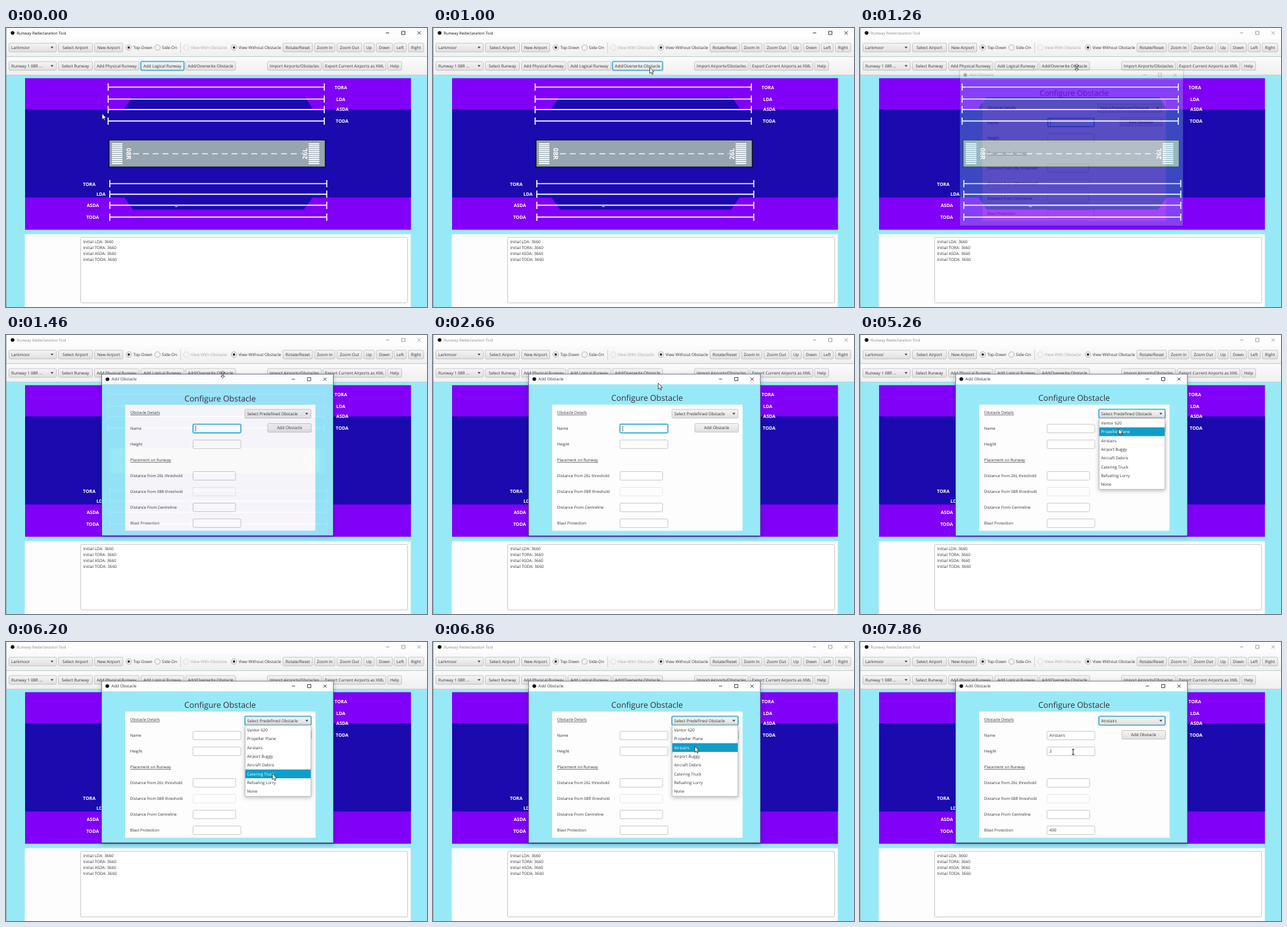
Animation, 640 px wide and 424 px high, one loop 8000 ms. Source, as an HTML page:

```html
<!DOCTYPE html>
<html lang="en">
<head>
<meta charset="utf-8">
<title>Runway Redeclaration Tool</title>
<style>
  html, body { margin: 0; width: 100%; height: 100%; overflow: hidden; }
  svg { display: block; width: 640px; height: 424px; }
  text { font: 6.2px "Open Sans", "Noto Sans", sans-serif; fill: #333; text-rendering: geometricPrecision; white-space: pre; }
  .mid { text-anchor: middle; }
  .tag { font-size: 7px; font-weight: 700; fill: #fff; text-anchor: middle; }
  .num { font-size: 10px; font-weight: 700; fill: #fff; text-anchor: middle; }
  .head { font-size: 12.25px; text-anchor: middle; }
  .btn { fill: url(#face); stroke: #bcbcbc; stroke-width: .8; }
  .field { fill: #fff; stroke: #c4c4c4; stroke-width: .9; }
  .focus { fill: none; stroke: #1a9fca; stroke-width: 1.1; }
  .glyph { fill: none; stroke: currentColor; stroke-width: .8; }
</style>
</head>
<body>
<svg id="stage" viewBox="0 0 640 424" xmlns="http://www.w3.org/2000/svg"></svg>
<script>
const WHITE = '#fdfdfd', CYAN = '#98e9f7', PURPLE = '#8000f8', BLUE = '#1b0aae';
const LOOP = 8000, ROW_TOP = 127, ROW_H = 13.35;
const OPEN_AT = 4600, PICK_AT = 7000;
const ITEMS = ['Vantor 620', 'Propeller Plane', 'Airstairs', 'Airport Buggy',
  'Aircraft Debris', 'Catering Truck', 'Refueling Lorry', 'None'];

const rect = (x1, y1, x2, y2, attrs = '') =>
  `<rect x="${x1}" y="${y1}" width="${x2 - x1}" height="${y2 - y1}" ${attrs}/>`;
const text = (x, cy, str, attrs = '') => `<text x="${x}" y="${cy + 2.2}" ${attrs}>${str}</text>`;
const path = (d, attrs = '') => `<path d="${d}" ${attrs}/>`;
const group = (id, body, attrs = '') => `<g id="${id}" ${attrs}>${body}</g>`;

const button = (x1, x2, cy, str) =>
  rect(x1, cy - 6.6, x2, cy + 6.6, 'rx="1.6" class="btn"') +
  text((x1 + x2) / 2, cy, str, 'class="mid"');
const focus = (id, x1, y1, x2, y2) =>
  group(id, rect(x1 - .8, y1 - .8, x2 + .8, y2 + .8, 'rx="2" fill="none" stroke="#9edcf0" stroke-width=".9"') +
    rect(x1, y1, x2, y2, 'rx="1.6" class="focus"'));
const combo = (x1, x2, cy, str, id = '') =>
  rect(x1, cy - 6.6, x2, cy + 6.6, 'rx="1.6" class="btn"') +
  text(x1 + 3.6, cy, str, id && `id="${id}"`) +
  path(`M${x2 - 8.8} ${cy - 1.2}h4.6l-2.3 2.6z`, 'fill="#333"');
const radio = (x, cy, str, on, dim) =>
  `<g ${dim ? 'opacity=".4"' : ''}><circle cx="${x}" cy="${cy}" r="4.2" fill="#f4f4f4" stroke="#ababab" stroke-width=".9"/>` +
  (on ? `<circle cx="${x}" cy="${cy}" r="1.9" fill="#333"/>` : '') +
  text(x + 6.8, cy, str) + '</g>';
const windowGlyphs = (x, cy) => path(
  `M${x - 2.5} ${cy}h5M${x + 21.5} ${cy - 2.5}h5v5h-5zM${x + 45.5} ${cy - 2.5}l5 5m0-5l-5 5`, 'class="glyph"');
const icon = (x, cy) => `<circle cx="${x}" cy="${cy}" r="2.8" fill="#111"/>`;

function toolbar() {
  let s = rect(0, 0, 640, 16, `fill="${WHITE}"`) + icon(10, 7.5) +
    group('mainBar', text(16.3, 7.6, 'Runway Redeclaration Tool', 'style="font-size:6px;fill:currentColor"') +
      windowGlyphs(580, 7.5));
  for (const y of [16, 44])
    s += rect(0, y, 640, y + 27.4, 'fill="url(#bar)"') + rect(0, y + 27, 640, y + 27.7, 'fill="#c2c2c2"');
  s += combo(4.5, 76.5, 29.7, 'Larkmoor') + combo(4.5, 76.5, 57.6, 'Runway 1 08R ...');
  const top = [[79.5, 131.5, 'Select Airport'], [134.5, 177.5, 'New Airport'], [421, 466, 'Rotate/Reset'],
    [469, 500, 'Zoom In'], [503, 541, 'Zoom Out'], [544, 560, 'Up'], [563, 587.5, 'Down'],
    [590, 608.5, 'Left'], [611.5, 635, 'Right']];
  const low = [[79.5, 131.5, 'Select Runway'], [134.5, 202, 'Add Physical Runway'],
    [205, 270.5, 'Add Logical Runway'], [273, 349, 'Add/Overwrite Obstacle'],
    [397.5, 479.5, 'Import Airports/Obstacles'], [482, 577.5, 'Export Current Airports as XML'], [580, 601.5, 'Help']];
  for (const [a, b, str] of top) s += button(a, b, 29.7, str);
  for (const [a, b, str] of low) s += button(a, b, 57.6, str);
  return s + radio(186.6, 29.7, 'Top-Down', true) + radio(230.3, 29.7, 'Side-On') +
    rect(265.2, 22, 265.9, 38, 'fill="#c4c4c4"') +
    radio(274, 29.7, 'View With Obstacle', false, true) + radio(346.6, 29.7, 'View Without Obstacle', true) +
    focus('focusLogical', 205, 51, 270.5, 64.2) + focus('focusAdd', 273, 51, 349, 64.2);
}

function runway() {
  let s = rect(29, 76.3, 615.6, 306.6, `fill="${PURPLE}"`) +
    path('M29 123.7H179L192 105H455L467 123.7H615.6V257.5H466L453 276H193L180 257.5H29z', `fill="${BLUE}"`) +
    rect(156, 169.8, 486, 211.6, 'fill="#0a0a14"') + rect(157.3, 170.8, 484.7, 210.6, 'fill="#97a5b0"');
  for (let i = 0; i < 11; i++) {
    const y = 175.2 + i * 2.98;
    s += rect(161, y, 177, y + 1.8, 'fill="#fff"') + rect(460, y, 476.3, y + 1.8, 'fill="#fff"');
  }
  s += path('M193 191.2H449', 'stroke="#fff" stroke-width="1.3" stroke-dasharray="9 6"') +
    '<text class="num" transform="translate(182.6 191.2) rotate(90)">08R</text>' +
    '<text class="num" transform="translate(458 191.2) rotate(-90)">26L</text>';
  const measure = (x1, x2, y, tx, ty, name) =>
    path(`M${x1} ${y}H${x2}M${x1} ${y - 5.5}v11M${x2} ${y - 5.5}v11`, 'stroke="#fff" stroke-width="1.6"') +
    `<text class="tag" x="${tx}" y="${ty + 2.5}">${name}</text>`;
  const upper = [['TORA', 89.8, 509, 90.4], ['LDA', 108, 509, 108.4], ['ASDA', 123.9, 511.4, 123.9], ['TODA', 141.4, 511, 141.9]];
  const lower = [['TORA', 236.5, 126.5, 237.8], ['LDA', 252.6, 144.5, 252.2], ['ASDA', 269.4, 132, 269.7], ['TODA', 287.4, 131.6, 287.8]];
  for (const [name, y, tx, ty] of upper) s += measure(155.3, 483.8, y, tx, ty, name);
  for (const [name, y, tx, ty] of lower) s += measure(157.8, 487.6, y, tx, ty, name);
  return s + path('M257 271.3h4', 'stroke="#a9e4f2" stroke-width="1"');
}

function log() {
  let s = rect(28.5, 313.4, 615.4, 424, `fill="${WHITE}"`) +
    rect(113.5, 318.3, 610.4, 417.8, 'rx="1.6" class="field"');
  ['LDA', 'TORA', 'ASDA', 'TODA'].forEach((name, i) => s += text(117.2, 324.8 + i * 9, `Initial ${name}: 3660`));
  return s;
}

function dialog() {
  let s = rect(145, 59, 498, 306, 'fill="#3b3a6a" filter="url(#shade)"') +
    rect(145.6, 59.6, 497.4, 75.2, `fill="${WHITE}"`) + rect(145.6, 75, 497.4, 304.8, `fill="${CYAN}"`) +
    icon(154, 67) + text(160.3, 67, 'Add Obstacle') +
    group('dialogGlyphs', windowGlyphs(437, 67), 'color="#222"') +
    text(325.5, 96, 'Configure Obstacle', 'class="head" dy="2.2"') +
    rect(181, 105.8, 470.6, 297.5, `fill="${WHITE}"`);
  const rows = [['Obstacle Details'], ['Name', 357, 'name'], ['Height', 357, 'height'], ['Placement on Runway'],
    ['Distance from 26L threshold', 349], ['Distance from 08R threshold', 349],
    ['Distance From Centreline', 349], ['Blast Protection', 357, 'blast']];
  rows.forEach(([label, right, id], i) => {
    const cy = 118.1 + i * 24;
    s += text(188.8, cy, label, `style="font-size:6px${right ? '' : ';text-decoration:underline'}"`);
    if (right) s += rect(284.3, cy - 6.5, right, cy + 6.5, `rx="1.6" class="field" ${i === 5 ? 'opacity=".4"' : ''}`);
    if (id) s += text(288, cy, '', `id="${id}"`);
  });
  s += focus('focusName', 284.3, 135.6, 357, 148.6) + rect(288.2, 138, 288.8, 146.4, 'id="caret" fill="#222"') +
    button(398, 464.4, 141.1, 'Add Obstacle') + combo(363.2, 463.8, 119.6, 'Select Predefined Obstacle', 'choice') +
    focus('focusChoice', 363.2, 113, 463.8, 126.2);
  let list = rect(363.4, 126.7, 463.6, 234.4, 'fill="#fff" stroke="#b4b4b4" stroke-width=".8" filter="url(#shade)"') +
    rect(363.8, 0, 463.2, ROW_H, 'id="hover" fill="#0f9ec8"');
  ITEMS.forEach((item, i) => list += text(366.4, ROW_TOP + (i + .5) * ROW_H, item, 'class="item"'));
  return s + group('list', list);
}

const cursors =
  group('arrow', path('M0 0V9.2L2.1 7.3 3.6 10.6 5 10 3.6 6.8H6.5z', 'fill="#fff" stroke="#111" stroke-width=".7"')) +
  group('resize', path('M0 -5.4L2.8 -2.4H.8V2.4H2.8L0 5.4-2.8 2.4H-.8V-2.4H-2.8z', 'fill="#fff" stroke="#111" stroke-width=".7"')) +
  group('beam', path('M-2 -4H2M0 -4V4M-2 4H2', 'fill="none" stroke="#111" stroke-width=".9"'));

const gradient = (id, a, b) =>
  `<linearGradient id="${id}" x2="0" y2="1"><stop stop-color="${a}"/><stop offset="1" stop-color="${b}"/></linearGradient>`;

document.getElementById('stage').innerHTML =
  `<defs>${gradient('face', '#f5f5f5', '#dfdfdf')}${gradient('bar', '#fbfbfb', '#efefef')}
   <filter id="shade" x="-10%" y="-10%" width="120%" height="125%"><feDropShadow dx="0" dy="1.5" stdDeviation="3" flood-opacity=".28"/></filter></defs>` +
  rect(0, 0, 640, 424, `fill="${CYAN}"`) + toolbar() + runway() + log() +
  rect(0, 0, .7, 424, 'fill="#8a9a9e"') + group('dialog', dialog()) + group('pointer', cursors);

const $ = id => document.getElementById(id);
const show = (id, on) => $(id).setAttribute('visibility', on ? 'inherit' : 'hidden');
const rowTexts = [...document.querySelectorAll('.item')];

// Pointer stops: time, x, y
const STOPS = [[60, 146, 130], [800, 329.5, 60], [2300, 329.5, 60], [3500, 389, 121], [4700, 389, 121],
  [5200, 393, 142], [5500, 394, 145], [6200, 405, 200], [6900, 398, 158], [7100, 398, 158], [7700, 324, 167]];

function pointerAt(t) {
  const k = STOPS.findIndex(s => s[0] > t);
  if (k < 1) return (k ? STOPS[STOPS.length - 1] : STOPS[0]).slice(1);
  const [t0, x0, y0] = STOPS[k - 1], [t1, x1, y1] = STOPS[k];
  const u = (t - t0) / (t1 - t0), e = u * u * (3 - 2 * u);
  return [x0 + (x1 - x0) * e, y0 + (y1 - y0) * e];
}

function draw(time) {
  const t = Math.floor(time / 200) * 200 + (time % 200 >= 60 ? 60 : 0);
  const [x, y] = pointerAt(t);
  const opened = t >= 1200, picked = t >= PICK_AT, listed = t >= OPEN_AT && !picked;

  $('mainBar').style.color = opened ? '#8c8c8c' : '#111';
  show('focusLogical', t < 860);
  show('focusAdd', t >= 860 && !opened);

  const u = Math.max(0, Math.min(1, (t - 1180) / 290));
  show('dialog', opened);
  $('dialog').setAttribute('opacity', u);
  $('dialog').setAttribute('transform', `translate(321.5 182.5) scale(${.95 + .05 * u}) translate(-321.5 -182.5)`);

  show('focusName', t < OPEN_AT);
  show('caret', t >= 1260 && t < OPEN_AT && Math.floor((t - 1260) / 500) % 2 === 0);
  show('focusChoice', t >= OPEN_AT);
  $('choice').textContent = picked ? 'Airstairs' : 'Select Predefined Obstacle';
  $('name').textContent = picked ? 'Airstairs' : '';
  $('height').textContent = picked ? '2' : '';
  $('blast').textContent = picked ? '400' : '';

  const row = Math.floor((y - ROW_TOP) / ROW_H);
  show('list', listed);
  show('hover', listed && row >= 0);
  $('hover').setAttribute('y', ROW_TOP + Math.max(0, row) * ROW_H);
  rowTexts.forEach((el, i) => el.style.fill = i === row ? '#fff' : '#333');

  const resize = opened && Math.abs(y - 60) < 2.5;
  const beam = picked && x < 357 && y > 160 && y < 172.5;
  show('resize', resize);
  show('beam', beam);
  show('arrow', !resize && !beam);
  $('pointer').setAttribute('transform', `translate(${x} ${y})`);
}

const start = performance.now();
function tick() {
  draw((performance.now() - start) % LOOP);
  requestAnimationFrame(tick);
}
tick();
</script>
</body>
</html>
```
